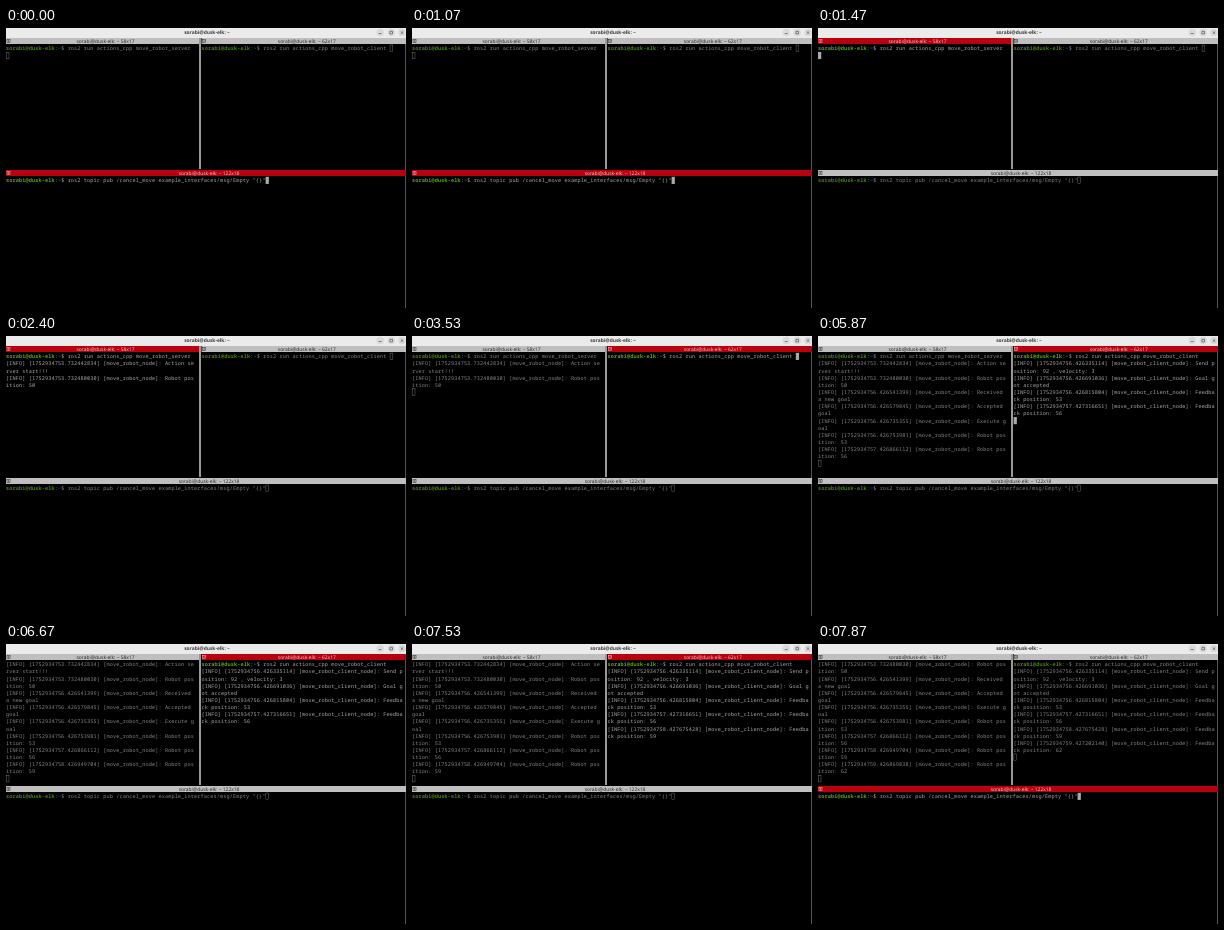
These frames come from a looping animation (400 px wide and 280 px high, 8000 ms). An HTML page:

```html
<!DOCTYPE html>
<html lang="en">
<head>
<meta charset="utf-8">
<title>Terminal</title>
<style>
  html, body { margin: 0; width: 100%; height: 100%; overflow: hidden; background: #000; }
  svg { display: block; width: 400px; height: 280px; }
  text { white-space: pre; text-rendering: geometricPrecision; }
  .mono { font: 5.192px "Noto Sans Mono", "DejaVu Sans Mono", monospace; letter-spacing: .13px; fill: #aaa; }
  .user { font-weight: 700; fill: #4fae0c; }
  .path { font-weight: 700; fill: #5a7fb0; }
  .label { font: 4.9px "Open Sans", "Noto Sans", sans-serif; text-anchor: middle; }
  .title { font-weight: 700; fill: #3d3d3d; }
</style>
</head>
<body>
<svg id="stage" viewBox="0 0 400 280"></svg>
<script>
const LOOP = 8000, CELL = 3.245, LINE = 7.14, BLINK = 600;
const USER = "sorabi@dusk-elk";
const stage = document.getElementById("stage");

const esc = s => s.replace(/&/g, "&amp;").replace(/</g, "&lt;");
const rect = (x, y, w, h, attrs) =>
  `<rect x="${x}" y="${y}" width="${w}" height="${h}" ${attrs}/>`;

// Log entries: [time shown, seconds, nanoseconds, message]
const serverLog = [
  [2000, 53, "732442834", "Action server start!!!"],
  [2000, 53, "732480030", "Robot position: 50"],
  [4670, 56, "426541399", "Received a new goal"],
  [4670, 56, "426579845", "Accepted goal"],
  [4670, 56, "426735355", "Execute goal"],
  [4670, 56, "426753981", "Robot position: 53"],
  [5670, 57, "426866112", "Robot position: 56"],
  [6670, 58, "426949704", "Robot position: 59"],
  [7670, 59, "426869838", "Robot position: 62"]
];
const clientLog = [
  [4730, 56, "426335114", "Send position: 92 , velocity: 3"],
  [4730, 56, "426691036", "Goal got accepted"],
  [4730, 56, "426815804", "Feedback position: 53"],
  [5730, 57, "427316651", "Feedback position: 56"],
  [6730, 58, "427675428", "Feedback position: 59"],
  [7730, 59, "427202140", "Feedback position: 62"]
];

// focus: [start, end, times at which the blink phase restarts]
const panes = [
  { x: 0, top: 10, w: 193, cols: 58, rows: 17,
    cmd: "ros2 run actions_cpp move_robot_server ", node: "move_robot_node",
    log: serverLog, enter: 0, focus: [[1130, 3530, [1130, 1800]]] },
  { x: 195.6, top: 10, w: 204.4, cols: 62, rows: 17,
    cmd: "ros2 run actions_cpp move_robot_client ", node: "move_robot_client_node",
    log: clientLog, enter: 4530, focus: [[3530, 7730, [3530, 4530]]] },
  { x: 0, top: 142, w: 400, cols: 122, rows: 18,
    cmd: 'ros2 topic pub /cancel_move example_interfaces/msg/Empty "{}"', node: "",
    log: [], enter: Infinity, focus: [[0, 1130, [-130]], [7730, LOOP, [7730]]] }
];

function wrap(s, cols) {
  const out = [];
  for (let i = 0; i < s.length; i += cols) out.push(s.slice(i, i + cols));
  return out;
}

function header(p, active) {
  const ink = active ? "#f3d0d0" : "#222";
  const y = p.top;
  return rect(p.x, y, p.w, 6, `fill="${active ? "#b8000f" : "#c0bebf"}"`) +
    rect(p.x + 1, y + 1.5, 3, 3, `fill="none" stroke="${ink}" stroke-width=".5"`) +
    rect(p.x + 2, y + 2.5, 1, 1, `fill="${ink}"`) +
    `<text class="label" x="${p.x + p.w / 2 + 3}" y="${y + 4.9}" fill="${ink}">${USER}: ~ ${p.cols}x${p.rows}</text>`;
}

function cursor(x, y, active, lit) {
  if (!active) return rect(x + .25, y + .25, CELL - .5, LINE - .5, 'fill="none" stroke="#aaa" stroke-width=".4"');
  return lit ? rect(x, y, CELL, LINE, 'fill="#aaa"') : "";
}

function pane(p, t) {
  const span = p.focus.find(([a, b]) => t >= a && t < b);
  let lit = true;
  if (span) {
    const start = Math.max(...span[2].filter(v => v <= t));
    lit = Math.floor((t - start) / BLINK) % 2 === 0;
  }

  const prompt = `<tspan class="user">${USER}</tspan>:<tspan class="path">~</tspan>$ ${esc(p.cmd)}`;
  const rows = [prompt];
  for (const [at, sec, ns, msg] of p.log) {
    if (t >= at) rows.push(...wrap(`[INFO] [17529347${sec}.${ns}] [${p.node}]: ${msg}`, p.cols));
  }

  const typing = t < p.enter;
  const row = typing ? 0 : rows.length;
  const col = typing ? USER.length + 4 + p.cmd.length : 0;
  const skip = Math.max(0, row + 1 - p.rows);
  const top = p.top + 6.8;
  const lines = rows.slice(skip).map((s, i) =>
    `<text class="mono" x="${p.x}" y="${(top + i * LINE + 5.45).toFixed(2)}">${s}</text>`).join("");

  return header(p, !!span) + `<g opacity="${span ? 1 : .8}">` + lines +
    cursor(p.x + col * CELL, top + (row - skip) * LINE, !!span, lit) + "</g>";
}

const button = (x, d) =>
  `<circle cx="${x}" cy="4.6" r="3.8" fill="#dadada"/>` +
  `<path d="M${x} 4.6${d}" fill="none" stroke="#3d3d3d" stroke-width=".6"/>`;

const frame =
  rect(0, 0, 400, 280, 'fill="#000"') +
  rect(0, 0, 400, 10, 'fill="#ebebeb"') +
  `<text class="label title" x="201" y="6.2">${USER}: ~</text>` +
  button(374.2, "m-1.4 .9h2.8") +
  button(385.2, "m-1.3 -1.3h2.6v2.6h-2.6z") +
  button(396, "m-1.3 -1.3l2.6 2.6m0 -2.6l-2.6 2.6") +
  rect(193, 10, 2, 131, 'fill="#999"') +
  rect(399, 16, 1, 264, 'fill="#555"');

let shown = "";
function draw(t) {
  const next = frame + panes.map(p => pane(p, t)).join("");
  if (next !== shown) stage.innerHTML = shown = next;
}

const begin = performance.now();
function tick() {
  draw((performance.now() - begin) % LOOP);
  requestAnimationFrame(tick);
}
draw(0);
requestAnimationFrame(tick);
</script>
</body>
</html>
```
